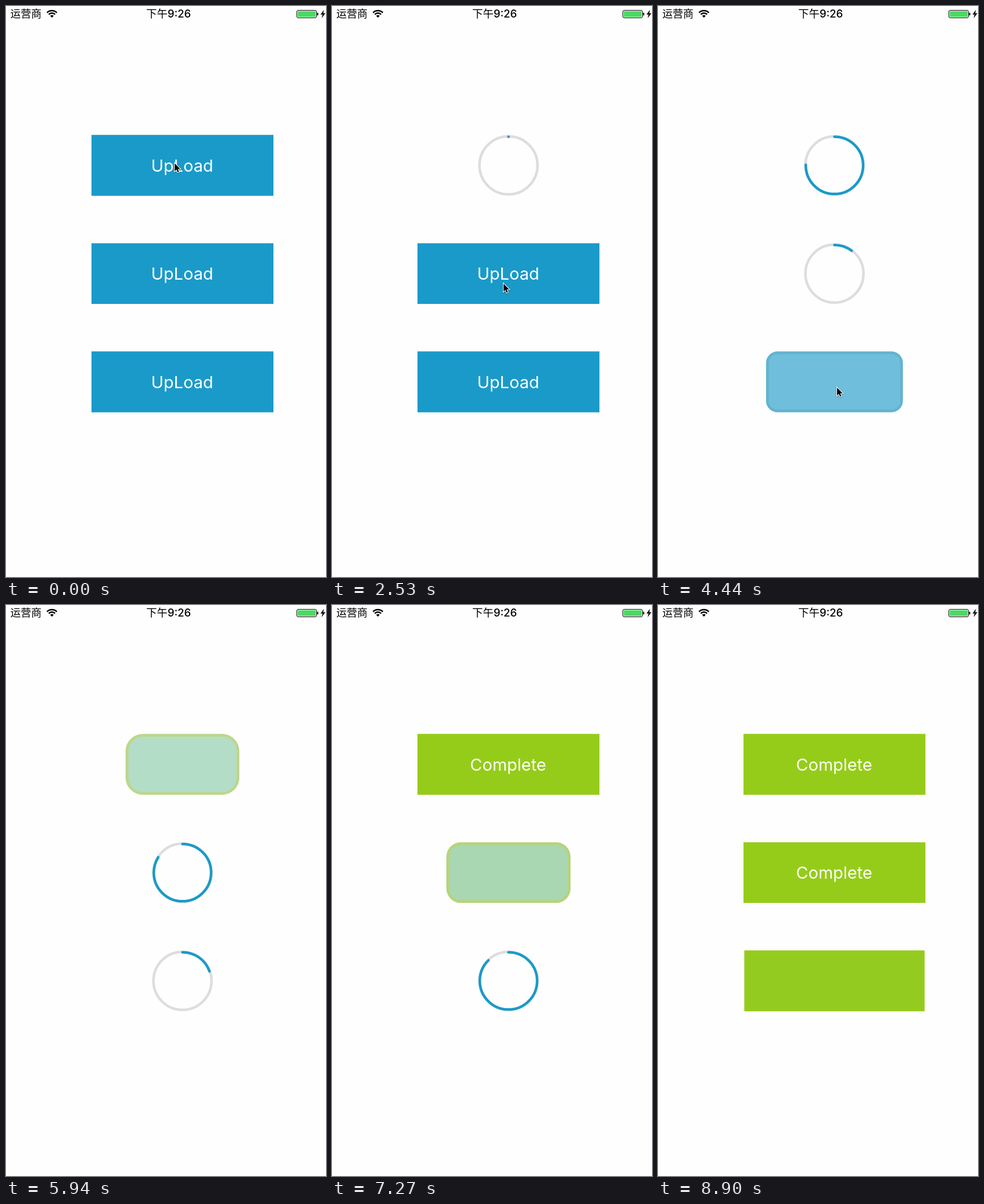
These frames come from a looping animation (554 px wide and 989 px high, 9000 ms). An HTML page with a canvas:

```html
<!DOCTYPE html>
<html lang="zh-CN">
<head>
<meta charset="utf-8">
<title>Upload buttons</title>
<style>
html, body { margin: 0; width: 100%; height: 100%; overflow: hidden; background: #fefefe; }
canvas { display: block; }
</style>
</head>
<body>
<canvas id="stage" width="554" height="989"></canvas>
<script>
const ctx = document.getElementById('stage').getContext('2d');

const LOOP = 9000, FIRST_STEP = 1650, STEP = 147.7;
const MORPH = 990, PROGRESS = 2960;
const CENTER_X = 305.5, WIDE = 315, SIZE = 105, BORDER = 4.5;
const BLUE = [26, 154, 201], GREEN = [149, 204, 26], GREY = [221, 221, 221];
const FONT = 'Inter, "Noto Sans CJK SC", "Noto Sans CJK", sans-serif';

const buttons = [
  { y: 276, start: 1525 },
  { y: 463.5, start: 2805 },
  { y: 651, start: 4035 },
];

// time, x, y of the pointer tip
const pointerPath = [
  [1800, 291.5, 271.5], [2380, 296.5, 503], [2520, 296.5, 480],
  [2980, 296.5, 480], [3700, 309.5, 660], [4500, 309.5, 660], [4950, 325, 965],
];

const lerp = (a, b, k) => a + (b - a) * k;
const clamp = v => Math.min(1, Math.max(0, v));
const mix = (a, b, k) => a.map((v, i) => lerp(v, b[i], k));
const rgba = (c, alpha = 1) => `rgba(${c.map(Math.round)},${alpha})`;

// cubic-bezier(.42, 0, .58, 1)
function ease(x) {
  let lo = 0, hi = 1;
  for (let i = 0; i < 24; i++) {
    const s = (lo + hi) / 2, r = 1 - s;
    if (1.26 * r * r * s + 1.74 * r * s * s + s ** 3 < x) lo = s; else hi = s;
  }
  return lo * lo * (3 - 2 * lo);
}

function text(str, x, y, font, color, align = 'center') {
  ctx.font = `${font} ${FONT}`;
  ctx.fillStyle = color;
  ctx.textAlign = align;
  ctx.fillText(str, x, y);
}

function polygon(points) {
  ctx.beginPath();
  points.forEach(([x, y]) => ctx.lineTo(x, y));
  ctx.closePath();
}

function roundBox(x, y, w, h, r) {
  ctx.beginPath();
  ctx.roundRect(x, y, w, h, Math.max(0, r));
}

// open: 0 is a ring, 1 is the full-width button
function drawBox(y, open, fill, border) {
  const w = lerp(SIZE, WIDE, open), r = SIZE / 2 * (1 - open);
  const x = CENTER_X - w / 2, top = y - SIZE / 2;
  roundBox(x, top, w, SIZE, r);
  ctx.fillStyle = fill;
  ctx.fill();
  roundBox(x + BORDER / 2, top + BORDER / 2, w - BORDER, SIZE - BORDER, r - BORDER / 2);
  ctx.strokeStyle = border;
  ctx.lineWidth = BORDER;
  ctx.stroke();
}

function drawButton({ y, start }, time) {
  const t = time - start;
  const expandAt = MORPH + PROGRESS;
  if (t < expandAt) {
    const open = 1 - ease(clamp(t / MORPH));
    drawBox(y, open, rgba(BLUE, open), rgba(mix(GREY, BLUE, open)));
  } else {
    const open = ease(clamp((t - expandAt) / MORPH));
    drawBox(y, open, rgba(mix(BLUE, GREEN, open), open), rgba(mix(GREY, GREEN, open)));
  }
  if (t > MORPH && t < expandAt) {
    const from = -Math.PI / 2, done = ease((t - MORPH) / PROGRESS);
    ctx.beginPath();
    ctx.arc(CENTER_X, y, 49.6, from, from + Math.max(done, 0.0005) * 2 * Math.PI);
    ctx.strokeStyle = rgba(BLUE);
    ctx.lineWidth = 4.5;
    ctx.lineCap = 'round';
    ctx.stroke();
    ctx.lineCap = 'butt';
  }
  if (t < 0) text('UpLoad', 305, y + 10.7, '29px', '#fff');
  if (t >= expandAt + MORPH) text('Complete', 305, y + 10.7, '29px', '#fff');
}

function drawStatusBar() {
  text('运营商', 7.5, 20.3, '18px', '#000', 'left');
  text('下午9:26', 281.5, 20.3, '500 18.5px', '#000');

  ctx.strokeStyle = ctx.fillStyle = '#000';
  ctx.lineWidth = 2.5;
  for (const r of [12, 7.7]) {
    ctx.beginPath();
    ctx.arc(79.5, 20, r, -Math.PI * 0.75, -Math.PI * 0.25);
    ctx.stroke();
  }
  ctx.beginPath();
  ctx.moveTo(79.5, 20.3);
  ctx.arc(79.5, 20, 4.2, -Math.PI * 0.75, -Math.PI * 0.25);
  ctx.fill();

  ctx.lineWidth = 1;
  roundBox(503.5, 7.5, 34, 13, 2.5);
  ctx.stroke();
  roundBox(538.5, 11.5, 2, 5, 1);
  ctx.fill();
  polygon([[550.5, 6.5], [544.5, 14.7], [548, 14.7], [546.5, 21], [553, 12.4], [549.2, 12.4]]);
  ctx.fill();
  ctx.fillStyle = '#4cd964';
  roundBox(505, 9, 31, 10, 1);
  ctx.fill();
}

function drawPointer(time) {
  const last = pointerPath.length - 1;
  if (time > pointerPath[last][0]) return;
  const i = Math.max(1, pointerPath.findIndex(p => time <= p[0]));
  const [t0, x0, y0] = pointerPath[i - 1], [t1, x1, y1] = pointerPath[i];
  const k = ease(clamp((time - t0) / (t1 - t0)));
  ctx.save();
  ctx.translate(lerp(x0, x1, k), lerp(y0, y1, k));
  polygon([[0.5, 1], [0.5, 14.5], [3.6, 11.7], [5.8, 16.6], [7.9, 15.7], [5.8, 10.9], [10, 10.7]]);
  ctx.shadowColor = 'rgba(0,0,0,.4)';
  ctx.shadowBlur = 2;
  ctx.shadowOffsetY = 1;
  ctx.strokeStyle = '#fff';
  ctx.lineWidth = 2;
  ctx.stroke();
  ctx.shadowColor = 'transparent';
  ctx.fillStyle = '#000';
  ctx.fill();
  ctx.restore();
}

// the picture advances in even steps after the opening pause
function stepTime(now) {
  const n = Math.floor((now % LOOP - FIRST_STEP + 18) / STEP);
  return n < 0 ? 0 : FIRST_STEP + n * STEP;
}

function draw(now) {
  const time = stepTime(now);
  ctx.fillStyle = '#fefefe';
  ctx.fillRect(0, 0, 554, 989);
  drawStatusBar();
  buttons.forEach(b => drawButton(b, time));
  drawPointer(time);
  requestAnimationFrame(draw);
}
requestAnimationFrame(draw);
</script>
</body>
</html>
```
